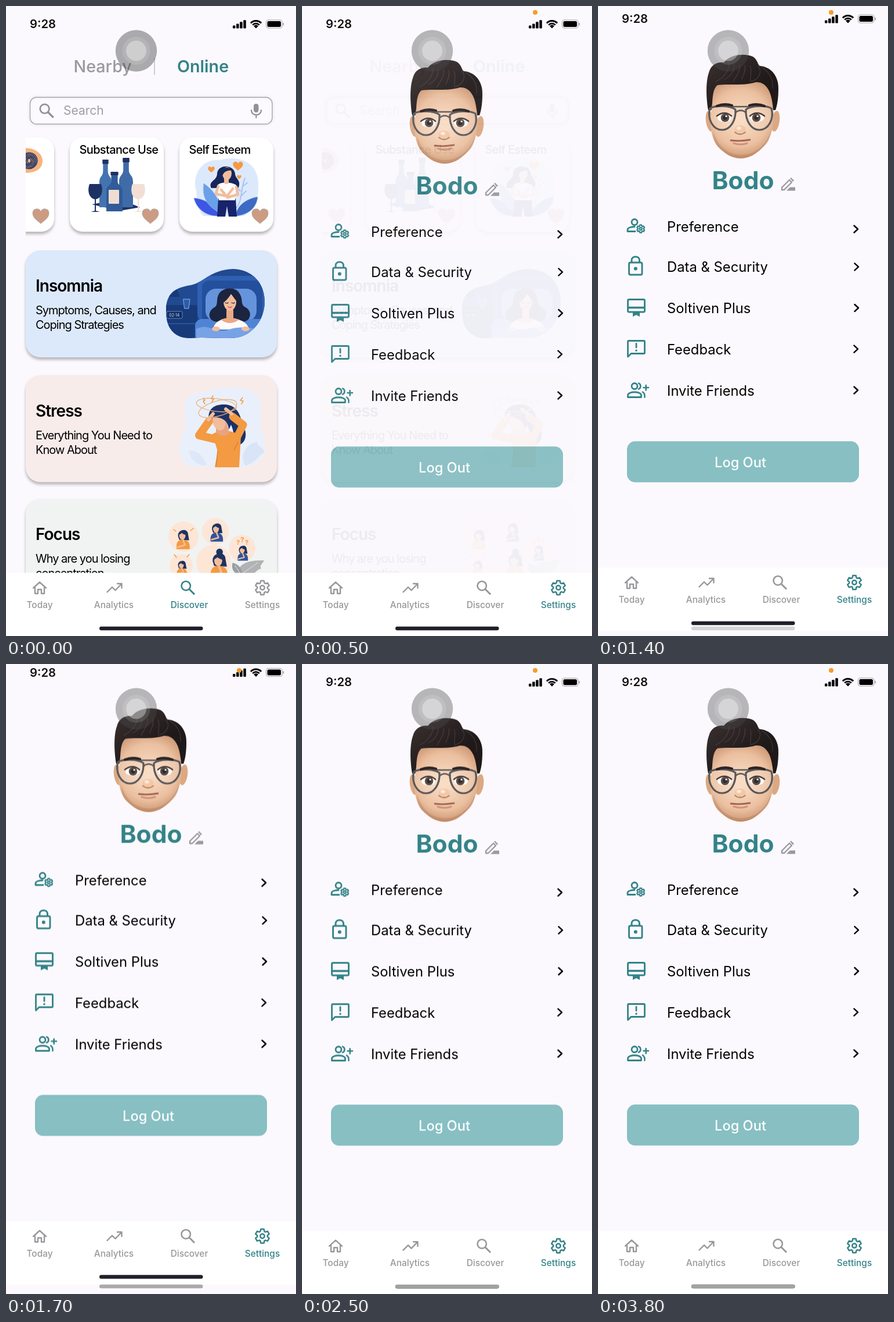
An HTML page with a canvas that plays this animation: 500 px wide and 1083 px high, repeating every 3.9 s.

```html
<!DOCTYPE html>
<html lang="en">
<head>
<meta charset="utf-8">
<title>Wellness app</title>
<style>
html, body { margin: 0; width: 100%; height: 100%; overflow: hidden; background: #fbf9fd; }
canvas { display: block; width: 500px; height: 1083px; }
</style>
</head>
<body>
<canvas id="stage"></canvas>
<script>
const W = 500, H = 1083, LOOP = 3900, STEP = 100;
const BG = '#fbf9fd', TEAL = [51, 131, 136], GREY = [153, 151, 155];
const NAVY = '#1d3263', BLUE = '#3f6ca8', SKIN = '#f2bd9c', ORANGE = '#f39a42', PEACH = '#fde6d6';
const ratio = window.devicePixelRatio || 1;
let g;

const rgb = c => `rgb(${c.map(Math.round)})`;
const mix = (a, b, p) => rgb(a.map((v, i) => v + (b[i] - v) * p));
const teal = rgb(TEAL);

// ---- drawing helpers ----
function paint(path, fill, line, w = 1) {
  if (fill) { g.fillStyle = fill; g.fill(path); }
  if (line) { g.strokeStyle = line; g.lineWidth = w; g.stroke(path); }
}
const shape = (d, fill, line, w) => paint(new Path2D(d), fill, line, w);
const stroke = (d, color, w) => shape(d, null, color, w);
function oval(x, y, rx, ry, fill, line, w, turn = 0) {
  const p = new Path2D();
  p.ellipse(x, y, rx, ry, turn, 0, 7);
  paint(p, fill, line, w);
}
const dot = (x, y, r, fill, line, w) => oval(x, y, r, r, fill, line, w);
function box(x, y, w, h, r, fill, line, lw) {
  const p = new Path2D();
  p.roundRect(x, y, w, h, r);
  paint(p, fill, line, lw);
}
function text(s, x, y, size, weight, color, gap = 0, align = 'left') {
  g.font = `${weight} ${size}px Inter, "Open Sans", sans-serif`;
  g.letterSpacing = gap + 'px';
  g.textAlign = align;
  g.fillStyle = color;
  g.fillText(s, x, y);
}
function at(x, y, scale, draw) {
  g.save();
  g.translate(x, y);
  g.scale(scale, scale);
  draw();
  g.restore();
}
function clipped(d, draw) {
  g.save();
  g.clip(new Path2D(d));
  draw();
  g.restore();
}
function card(x, y, w, h, r, fill) {
  g.save();
  g.shadowColor = 'rgba(0,0,0,.28)';
  g.shadowBlur = 5 * ratio;
  g.shadowOffsetY = 4 * ratio;
  box(x, y, w, h, r, fill);
  g.restore();
}
function fit(canvas) {
  canvas.width = W * ratio;
  canvas.height = H * ratio;
  const c = canvas.getContext('2d');
  c.scale(ratio, ratio);
  c.lineCap = c.lineJoin = 'round';
  return c;
}
function layer(draw) {
  const canvas = document.createElement('canvas');
  g = fit(canvas);
  g.fillStyle = BG;
  g.fillRect(0, 0, W, H);
  draw();
  return canvas;
}

// ---- icons ----
function heart(x, y, s, fill, line) {
  at(x, y, s, () => shape('M0 11C-6 6-12 2-12-4C-12-11-3-13 0-6C3-13 12-11 12-4C12 2 6 6 0 11Z', fill, line, 1));
}
function gear(x, y, r, color, w) {
  const p = new Path2D();
  for (let tooth = 0; tooth < 6; tooth++) {
    for (const [turn, reach] of [[-.4, .72], [-.22, 1], [.22, 1], [.4, .72]]) {
      const a = tooth * Math.PI / 3 + turn;
      p.lineTo(x + Math.sin(a) * r * reach, y - Math.cos(a) * r * reach);
    }
  }
  p.closePath();
  paint(p, null, color, w);
  dot(x, y, r * .3, null, color, w);
}
function lens(x, y, s, color, w) {
  at(x, y, s, () => {
    dot(-3, -3, 7, null, color, w);
    g.lineCap = 'butt';
    stroke('M2 2L10.5 10.5', color, w * 1.2);
  });
}
function person(x, y, color) {
  dot(x, y - 7, 5, null, color, 2.8);
  stroke(`M${x + 1} ${y + 9}H${x - 12}V${y + 6}C${x - 12} ${y + 2} ${x - 4} ${y + 1} ${x} ${y + 1}`, color, 2.8);
}

// ---- illustrations ----
function bottle(x, y, w, h, fill) {
  const n = w * .2, m = x + w / 2;
  shape(`M${m - n} ${y}H${m + n}V${y + h * .24}C${m + n} ${y + h * .36} ${x + w} ${y + h * .34} ${x + w} ${y + h * .48}V${y + h}H${x}V${y + h * .48}C${x} ${y + h * .34} ${m - n} ${y + h * .36} ${m - n} ${y + h * .24}Z`, fill);
  box(m - n - 1, y, n * 2 + 2, h * .09, 1, NAVY);
}
function glass(x, y, fill) {
  shape(`M${x - 10} ${y}H${x + 10}C${x + 15} ${y + 14} ${x + 9} ${y + 25} ${x + 1} ${y + 26}V${y + 46}L${x + 8} ${y + 48}H${x - 8}L${x - 1} ${y + 46}V${y + 26}C${x - 9} ${y + 25} ${x - 15} ${y + 14} ${x - 10} ${y}Z`, fill);
}
function drinks() {
  shape('M148 341L196 332L231 346L196 352Z', NAVY);
  bottle(161, 264, 21, 82, '#4474b0');
  bottle(195, 261, 24, 85, BLUE);
  bottle(173, 285, 28, 68, '#315b99');
  box(177, 316, 18, 24, 1, '#efddd2');
  glass(154, 306, NAVY);
  glass(228, 306, '#f1dfd5');
}
function selfLove() {
  shape('M328 318C320 290 338 262 368 265C392 258 428 262 434 296C440 330 424 352 410 361H340C330 350 330 334 328 318Z', '#dce9fc');
  const leaf = (d, c) => shape(d, c, '#8eb4ee', .8);
  leaf('M364 361C344 361 328 348 324 330C346 332 360 344 368 360Z', '#3d57e4');
  leaf('M366 354C344 342 338 326 341 305C360 318 370 336 370 354Z', '#6aa0e8');
  leaf('M396 360C398 344 412 332 434 328C432 346 420 358 398 361Z', '#3d6bc4');
  stroke('M398 346C408 334 404 314 412 296M404 328L414 318M404 318L397 310M408 310L416 304', '#a8c4f0', 2);
  shape('M354 313C348 301 363 301 364 289C364 272 392 271 395 288C395 297 406 299 401 312Z', '#17265a');
  shape('M366 331H396L398 362H384L381 344L378 362H364Z', '#17246b');
  shape('M364 309C368 302 388 302 397 308L395 334H367Z', '#fff');
  box(376, 294, 8, 12, 3, SKIN);
  oval(381, 288, 8, 11, SKIN);
  shape('M371 286C372 276 386 276 391 283C382 282 376 284 373 292Z', '#17265a');
  stroke('M366 310L362 323L381 327L391 314M397 311L400 324L382 329L371 316', SKIN, 4.5);
  heart(354, 281, .48, ORANGE);
  heart(400, 275, .72, ORANGE);
  heart(402, 294, .32, ORANGE);
}
function scribble() {
  shape('M20 245C46 240 64 252 63 267C62 284 45 289 20 286Z', '#f6b37e');
  for (let i = 0; i < 6; i++) oval(40, 266, 3 + i * 2.2, 4 + i * 1.9, null, NAVY, 1.6, i * .5);
}
function sleeper() {
  const blob = 'M276 522C276 496 290 484 318 480C345 474 350 454 392 452C426 453 446 478 446 508C446 540 424 566 398 570C370 573 345 568 318 571C292 571 275 556 276 522Z';
  clipped(blob, () => {
    box(270, 445, 180, 130, 0, '#214a91');
    box(330, 464, 120, 80, 16, '#2f60b2');
    box(338, 472, 104, 80, 12, '#244f9c');
    box(270, 514, 60, 60, 2, '#183a78');
    stroke('M270 546H328M290 470V484', '#3f6fbd', 1.2);
    shape('M281 500L286 486H294L300 500Z', '#183a78');
    box(277, 525, 27, 12, 2, '#122b5c', '#5d8bd4', 1);
    text('02:14', 281, 534, 7, 500, '#b9d0f4');
    shape('M306 504H317L315 520H308Z', '#2c5cab', '#8eb4ee', 1);
    box(344, 486, 88, 56, 18, '#6594dc');
    box(326, 538, 125, 40, 12, '#4f83d4');
    shape('M366 543C347 543 346 524 361 517C366 512 362 503 367 495C374 483 397 482 403 495C409 504 404 511 411 517C426 523 424 544 405 543Z', '#1b2440');
    shape('M357 556C359 541 374 537 386 537C398 537 416 541 419 556Z', '#fffafa');
    shape('M370 539Q386 533 402 539Q386 551 370 539Z', '#e9a986');
    box(380, 520, 12, 22, 4, '#e9a986');
    oval(386, 508, 11, 16, SKIN);
    shape('M372 512C372 492 380 490 387 490C397 491 401 500 401 512C396 506 392 500 388 495C384 502 378 508 372 512Z', '#1b2440');
    stroke('M378 510Q381 512 383 510M389 510Q392 512 394 510', '#1b2440', 1.2);
    stroke('M383 517Q386 520 389 517', '#c75b4c', 1.6);
    shape('M328 555Q342 548 356 555Q372 562 388 555Q404 550 432 555V580H328Z', '#78a2e6');
    oval(362, 555, 7, 4, SKIN);
    oval(413, 555, 7, 4, SKIN);
  });
}
function stressed() {
  shape('M300 770C294 745 312 735 310 712C300 680 318 660 345 664C370 652 425 650 436 675C446 700 432 715 444 740C452 775 435 795 400 792H330C312 793 303 785 300 770Z', '#e9f0fc');
  shape('M412 790C402 768 416 752 434 749C430 757 446 758 445 768C434 772 432 786 412 790Z', '#d9e4f6');
  shape('M346 790C340 772 330 764 315 764C318 780 328 790 346 790Z', '#dde7f7');
  shape('M350 714C346 692 360 684 378 685C400 687 404 704 408 720C418 735 413 753 400 755C392 748 394 724 384 714Z', '#1c3266');
  shape('M356 736C366 728 394 728 405 740L402 793H360L365 766Z', ORANGE);
  shape('M362 718L380 714L385 734C376 743 366 738 362 732Z', '#e7a47f');
  oval(367, 713, 11, 17, SKIN, null, 0, -.25);
  shape('M349 710C350 690 380 684 392 700C390 714 388 722 384 728C384 712 368 702 349 710Z', '#1c3266');
  stroke('M362 745L333 738L350 714', ORANGE, 14);
  stroke('M398 742L409 720L391 706', ORANGE, 13);
  stroke('M349 711L357 701M389 701L379 693', SKIN, 6);
  stroke('M365 765L362 790M400 750L393 764', '#d97d2a', 1.2);
  oval(363, 686, 35, 11, null, '#eeb27c', 1.3, .12);
  oval(365, 692, 34, 13, null, '#eeb27c', 1.3, -.28);
  stroke('M340 674L343 678L340 679L343 684M357 670L354 675L358 676L355 681M408 673L404 678L409 679L406 684', ORANGE, 1.5);
}
function thinker(x, y, s, top, bun) {
  at(x, y, s, () => {
    shape('M-9-2C-12-16 10-20 10-6L12 5L-7 4Z', NAVY);
    if (bun) dot(1, -17, 5, NAVY);
    shape('M-12 22C-14 8-8 4 0 4C10 4 14 10 13 22Z', top);
    oval(-1, -4, 6, 8, SKIN);
    shape('M-8-5C-6-15 7-14 7-5C2-6-1-8-2-9Z', NAVY);
    stroke('M-10 18L4 14L0 4', SKIN, 3);
  });
}
function focusGroup() {
  const ring = (x, y, r) => dot(x, y, r, PEACH);
  ring(306, 912, 26); ring(361, 903, 23); ring(407, 932, 23); ring(302, 962, 20); ring(358, 956, 30);
  thinker(305, 914, .9, ORANGE);
  thinker(363, 902, .85, '#2e549b');
  thinker(408, 938, .7, '#2e549b');
  thinker(303, 964, .7, ORANGE);
  thinker(367, 958, 1.15, ORANGE, true);
  text('?', 397, 926, 11, 700, ORANGE);
  text('?', 404, 922, 12, 700, ORANGE);
  text('?', 412, 926, 11, 700, ORANGE);
  stroke('M289 900L293 903M318 902L323 898M294 948L290 943M312 947L316 943', ORANGE, 1.5);
  shape('M400 980C398 964 408 952 445 953C441 961 437 961 440 967C430 970 428 978 418 982Z', '#b0b2b3');
  shape('M404 980C390 974 388 964 391 957C403 960 408 970 408 980Z', '#9c9fa1');
  stroke('M404 978L434 957M404 976L395 962', '#e4e6e6', 1);
}
function avatar() {
  const skin = g.createRadialGradient(246, 205, 8, 246, 200, 76);
  skin.addColorStop(0, '#f9dcc4');
  skin.addColorStop(.6, '#ebc0a0');
  skin.addColorStop(1, '#c58d69');
  const hair = g.createLinearGradient(200, 95, 250, 165);
  hair.addColorStop(0, '#3a302f');
  hair.addColorStop(1, '#1f191a');
  oval(193, 207, 7, 18, '#dba882', null, 0, -.15);
  oval(306, 207, 7, 18, '#dba882', null, 0, .15);
  shape('M190 188C186 164 186 138 191 124C195 109 206 105 217 106C228 92 252 90 267 96C276 102 275 110 279 112C302 114 312 134 311 152C311 168 309 180 306 188Z', hair);
  shape('M197 176C198 158 200 150 206 145C226 142 250 147 272 140C288 139 298 152 301 178C305 206 302 232 286 250C272 265 259 271 246 271C233 271 220 265 206 250C192 232 193 206 197 176Z', skin);
  shape('M199 226C208 254 228 265 247 265C266 265 286 254 298 226C296 240 292 246 286 250C272 265 259 271 246 271C233 271 220 265 206 250C202 244 199 236 199 226Z', 'rgba(150,95,62,.25)');
  for (let i = 0; i < 5; i++)
    stroke(`M${203 + i * 15} ${139 - i % 2 * 4}C${214 + i * 12} ${134 - i * 2} ${226 + i * 10} ${122 - i} ${226 + i * 9} ${108 + i}`, 'rgba(110,92,90,.4)', 1.3);
  stroke('M276 112C284 122 278 134 264 139M282 114C298 124 302 138 301 150', 'rgba(110,92,90,.4)', 1.3);
  const side = s => {
    const x = v => 246 + s * v;
    oval(x(28), 201, 12, 7.5, '#fffdfb');
    dot(x(27), 201, 7.3, '#45362f');
    dot(x(27), 201, 3.8, '#110f10');
    dot(x(27) + 2, 198.5, 1.6, '#fff');
    stroke(`M${x(41)} 198Q${x(28)} 188 ${x(16)} 198`, '#30211d', 2.6);
    shape(`M${x(9)} 187C${x(18)} 180 ${x(44)} 179 ${x(53)} 185C${x(58)} 203 ${x(48)} 222 ${x(32)} 222C${x(18)} 222 ${x(8)} 206 ${x(9)} 187Z`, 'rgba(255,255,255,.12)', '#59585b', 3.2);
    stroke(`M${x(41)} 181Q${x(28)} 176 ${x(15)} 180`, '#2d2323', 4.4);
  };
  side(-1);
  side(1);
  stroke('M233 182H259M237 192Q246 185 255 192', '#59585b', 2.5);
  oval(245, 222, 10, 8, '#f2c8a8');
  stroke('M236 226Q245 233 254 226', '#bd8560', 2.2);
  oval(243, 219, 4, 3, 'rgba(255,245,232,.7)');
  stroke('M229 240Q245 242 262 239', '#a36550', 2.8);
  stroke('M234 245Q246 249 257 245', '#d0927a', 3);
}

// ---- screens ----
function topic(x, title, art) {
  card(x, 226, 162, 162, 22, '#fff');
  text(title, x + 16.5, 254, 20, 500, '#000', -.65);
  art();
  heart(x + 139, 361, 1.16, '#cd9b82', '#b9a197');
}
function article(y, fill, title, lines, art) {
  card(34, y, 433, 184, 25, fill);
  text(title, 51, y + 71, 28, 600, '#000', -1);
  lines.forEach((s, i) => text(s, 51, y + 110 + i * 25, 20, 400, '#000', -1));
  art();
}
function home() {
  text('Nearby', 116.5, 114, 28.7, 500, '#9b999d');
  text('Online', 295, 114, 28.7, 600, teal);
  stroke('M256 91V118', '#c0bec2', 1.5);
  g.save();
  g.shadowColor = 'rgba(0,0,0,.08)';
  g.shadowBlur = 6 * ratio;
  box(41.5, 157, 417.5, 46, 11, '#fcfafe', '#a9a7ab', 1.4);
  g.restore();
  lens(70, 180, 1.12, '#929094', 2.4);
  text('Search', 99, 187, 21, 400, '#a09ea2');
  box(427, 168, 8.5, 15, 4.2, '#929094');
  stroke('M423 179C423 190 440 190 440 179M431.3 187V192', '#929094', 2.2);
  clipped('M34 215H480V405H34Z', () => {
    topic(-79, '', scribble);
    topic(110, 'Substance Use', drinks);
    topic(299, 'Self Esteem', selfLove);
  });
  article(420, '#dce9fb', 'Insomnia', ['Symptoms, Causes, and', 'Coping Strategies'], sleeper);
  article(634.5, '#f8ecea', 'Stress', ['Everything You Need to', 'Know About'], stressed);
  article(847, '#f1f3f2', 'Focus', ['Why are you losing', 'concentration'], focusGroup);
}
function rowIcons() {
  person(63, 387.5, teal);
  gear(73.7, 392, 6.8, teal, 2.2);
  box(53.5, 450, 22.5, 21, 2.5, null, teal, 2.9);
  stroke('M58 449V446C58 438 71.5 438 71.5 446V449', teal, 2.9);
  dot(64.8, 460.5, 3, teal);
  box(51.5, 513.5, 29, 21.5, 2, null, teal, 2.9);
  stroke('M52 527.5H80', teal, 3.4);
  shape('M60 535H72V543L66 540L60 543Z', teal);
  shape('M51.5 612V586Q51.5 584.5 53 584.5H79Q80.5 584.5 80.5 586V605Q80.5 606.5 79 606.5H57Z', null, teal, 2.8);
  stroke('M66 589.5V596', teal, 2.8);
  dot(66, 601.3, 1.7, teal);
  dot(63, 662.5, 5, null, teal, 2.8);
  shape('M51.5 681.5V678C52 671 74 671 74.5 678V681.5Z', null, teal, 2.8);
  stroke('M70 657.5C74.5 659 74.5 666 70 667.5M77 672.5Q81 675 80.5 681.5M78.5 665H87M82.7 661V669.5', teal, 2.6);
}
function settings() {
  avatar();
  text('Bodo', 250, 324, 42.5, 700, teal, 0, 'center');
  stroke('M317 325V321L330 308L334 312L321 325Z', '#9b999d', 2.3);
  shape('M331 305L333 304L338 309L336 311Z', '#9b999d');
  shape('M325 326.5L331 320.5H340V326.5Z', '#9b999d');
  ['Preference', 'Data & Security', 'Soltiven Plus', 'Feedback', 'Invite Friends'].forEach((s, i) => {
    const y = [397, 466.3, 537, 607.7, 678.5][i];
    const x = [445, 446, 446, 445, 445][i];
    const cy = i ? y - 9 : y - 4.5;
    text(s, 119, y, 23.8, 400, '#000');
    stroke(`M${x - 3.5} ${cy - 6}L${x + 3} ${cy}L${x - 3.5} ${cy + 6}`, '#000', 2.5);
  });
  rowIcons();
  box(50, 757.3, 400, 70.5, 14, '#87bfc3');
  text('Log Out', 245.5, 801.5, 23.6, 500, '#fff', 0, 'center');
}
function statusBar() {
  text('9:28', 41, 38, 20.3, 600, '#111');
  for (let i = 0; i < 4; i++) box(391 + i * 6.1, 33.5 - i * 3.1, 4.5, 5 + i * 3.1, 1.2, '#000');
  g.lineCap = 'butt';
  const wave = (r, w) => {
    const p = new Path2D();
    p.arc(431, 38, r, -Math.PI * .76, -Math.PI * .24);
    paint(p, null, '#000', w);
  };
  wave(12.5, 2.8);
  wave(7.9, 2.7);
  shape('M431 38.5L427 34.2Q431 31 435 34.2Z', '#000');
  g.lineCap = 'round';
  box(448.5, 24, 27.5, 14, 4, null, '#a6a5a8', 1.1);
  box(450.5, 26, 23.5, 10, 2.5, '#000');
  box(477.3, 28.8, 1.8, 4.6, 1, '#a6a5a8');
}
function tabBar(p) {
  g.fillStyle = '#fff';
  g.fillRect(0, 974.5, W, H - 974.5);
  const idle = rgb(GREY), leave = mix(TEAL, GREY, p), enter = mix(GREY, TEAL, p);
  stroke('M47 1000.5L58 990.5L69 1000.5M50 999V1010H55V1003H61V1010H66V999', idle, 2.4);
  stroke('M174.5 1007.5L183 999L188.5 1004.5L198.5 994M192 993H199.5V1000.5', idle, 2.4);
  lens(313.5, 1000, 1.1, leave, 2.3);
  gear(442, 1000, 12.3, enter, 2.5);
  [['Today', 58, idle], ['Analytics', 186, idle], ['Discover', 316, leave], ['Settings', 442, enter]]
    .forEach(([s, x, c]) => text(s, x, 1035, 15.4, 500, c, 0, 'center'));
  box(161, 1066.7, 178.5, 6.6, 3.3, '#201f2a');
}

// ---- motion ----
function track(keys, t) {
  const i = keys.findIndex(k => k[0] > t);
  if (i === 0) return keys[0][1];
  if (i < 0) return keys[keys.length - 1][1];
  const [t0, a] = keys[i - 1], [t1, b] = keys[i];
  return a + (b - a) * (t - t0) / (t1 - t0);
}
const PULL = [[1000, 0], [1200, -.7], [1400, -9], [1600, -15.5], [1700, -16.5], [1800, -14],
  [1900, -3], [2000, 4], [2100, 3.5], [2300, 1.2], [2500, .2], [2700, 0]];
const BAR_SHOW = [[500, 0], [900, 1]];
const BAR_TONE = [[1200, 242], [1700, 170], [2000, 130], [2500, 162]];
const DOT_SIZE = [[100, 0], [300, 2.2], [500, 4]];

const homeLayer = layer(home), settingsLayer = layer(settings);
const main = fit(document.getElementById('stage'));

function overlay(t, p) {
  g.globalAlpha = track(BAR_SHOW, t);
  const tone = track(BAR_TONE, t);
  box(161, 1066.7, 178.5, 6.6, 3.3, rgb([tone, tone, tone]));
  g.globalAlpha = 1;
  dot(402, 11, track(DOT_SIZE, t), '#f79a2c');
  dot(224.5, 77, 35.7, `rgba(72,72,74,${.45 - .06 * p})`);
  dot(224.5, 77, 24, 'rgba(255,255,255,.12)');
  dot(224.5, 77, 17.5, 'rgba(255,255,255,.34)');
}
function render(t) {
  g = main;
  const u = Math.min(1, Math.max(0, (t - 60) / 540));
  const p = 1 - (1 - u) ** 1.75;
  g.globalAlpha = 1;
  g.fillStyle = BG;
  g.fillRect(0, 0, W, H);
  g.save();
  g.translate(0, track(PULL, t));
  // the old screen dissolves above the new one
  g.drawImage(settingsLayer, 0, 0, W, H);
  g.globalAlpha = 1 - p;
  g.drawImage(homeLayer, 0, 0, W, H);
  g.globalAlpha = 1;
  statusBar();
  tabBar(p);
  g.restore();
  overlay(t, p);
}
const start = performance.now();
function tick() {
  const t = (performance.now() - start) % LOOP;
  render(Math.floor(t / STEP) * STEP);
  requestAnimationFrame(tick);
}
tick();
</script>
</body>
</html>
```
